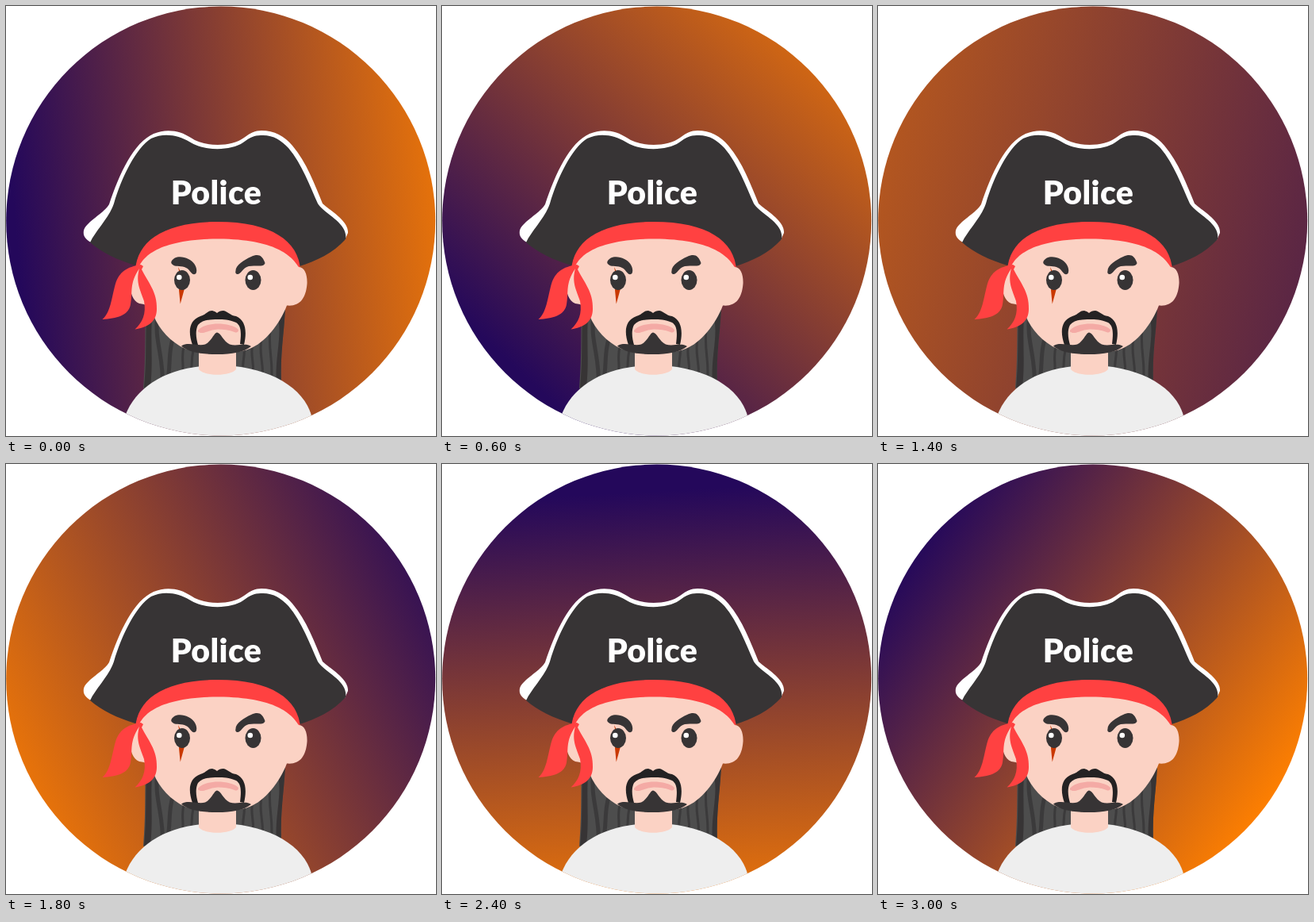
An HTML page that plays this animation: 542 px wide and 542 px high, repeating every 3.2 s.

```html
<!DOCTYPE html>
<html lang="en">
<head>
<meta charset="utf-8">
<title>Pirate badge</title>
<style>
  html, body { margin: 0; width: 100%; height: 100%; overflow: hidden; background: #fff; }
  svg { display: block; width: 100%; height: 100%; }
  .ink { fill: #373435; }
  .skin { fill: #fbd2c4; }
  .red { fill: #ff4141; }
  .white { fill: #fff; }
  .strand { fill: none; stroke: #3b3a3b; stroke-width: 3; }
  text { font: 900 41px Lato, "Open Sans", sans-serif; letter-spacing: .4px; fill: #fff; text-anchor: middle; }
</style>
</head>
<body>
<svg viewBox="0 0 542 542">
  <defs>
    <linearGradient id="sky" gradientUnits="userSpaceOnUse">
      <stop offset="0" stop-color="#24085b"/>
      <stop offset="1" stop-color="#ff8000"/>
    </linearGradient>
    <clipPath id="disc"><circle cx="270.7" cy="271" r="270.5"/></clipPath>
  </defs>
  <circle cx="270.7" cy="271" r="270.5" fill="url(#sky)"/>

  <!-- hair -->
  <path fill="#4d4d4d" d="M177 374C174 402 177 432 173 482L215 478L245 456V420L200 370Z"/>
  <path fill="#4d4d4d" d="M352 370C352 405 345 435 347 477L310 470L288 456V420L330 370Z"/>
  <path class="ink" d="M178 380L185 384C181 415 186 445 182 480L174 481C178 440 175 410 178 380ZM340 384L352 374C352 405 345 435 347 477L341 476C338 440 351 410 340 384Z"/>
  <g class="strand">
    <path stroke-width="5" d="M191 390C186 420 200 445 197 480M210 420C204 440 208 455 203 476"/>
    <path d="M224 430C220 445 226 455 221 468M236 434C233 448 235 455 233 462M300 430C302 440 297 450 299 462M311 426C307 440 314 450 311 470M322 420C318 440 326 450 323 474M333 408C330 435 338 450 334 476"/>
  </g>

  <!-- body -->
  <path clip-path="url(#disc)" fill="#eee" d="M150 517C164 479 205 453 267 453C329 453 376 480 385.500 518L380 542H150Z"/>
  <path class="skin" d="M243 428H290V458C283 467 250 467 243 458Z"/>

  <!-- hat -->
  <path class="white" d="M107 298C99 293 97 289 98 283C101 272 124 261 130 250C143 211 161 172 186 161C202 154 220 157 233 166C250 178 284 178 300 166C308 160 314 157 322 157C338 157 351 164 361 176C379 197 389 225 399 249C410 259 432 271 431 286L427 295Z"/>
  <path class="ink" d="M106 298C113 283 130 267 136 249C146 215 164 179 183 167C199 159 218 163 231 171C249 183 283 183 299 172C307 166 313 163 321 163C336 162 347 169 356 179C373 199 383 227 393 249C401 262 432 274 428 294C413 311 390 322 370 328L163 327C140 320 121 311 106 298Z"/>
  <text x="265" y="249.500">Police</text>
  <path class="red" d="M163 333C165 296 200 272 267 272C334 272 369 296 371 333Z"/>

  <!-- head -->
  <path class="skin" d="M166 333C171 317 190 294 268 293.500C340 294 360 315 369 329C377 329 380 340 379.500 350C378 369 370 379 354 377.500C345 401 326 425 307 432C287 440 246 440 226 432C208 424 193 408 186 390C180 378 177 376 168 375C159 371 156 360 156.500 347C157 338 161 334 166 333Z"/>
  <path class="red" d="M170 326C152 329 143 335 138 350C133 368 132 386 121.500 395C139 394 155 390 157 376C160 361 155 350 168 331C163 349 170 359 174 372C177 388 172 399 162.500 407.500C180 405 190 397 190 382C191 360 178 347 171 332L173 328Z"/>

  <!-- face -->
  <path fill="#c93800" d="M217 329C222 338 225 349 224.500 358L219.700 375.500L218 358C221 349 219 338 217 329Z"/>
  <g id="eye">
    <ellipse class="ink" cx="222" cy="345.500" rx="10" ry="12.500"/>
    <circle class="white" cx="218.300" cy="342" r="3.300"/>
  </g>
  <use href="#eye" x="89.500"/>
  <path class="ink" d="M208.500 322C212 315 222 315 230 319C238 323 242 331 239.500 337C235 341 233 334 228 330.500C221 326 215 330 210 326Q207.500 324 208.500 322ZM289.500 334C289 327 300 320 309 316C318 312 323 314 326.500 324C325 330 314 326 306 328C298 330 296 339 291 338Q288.500 337 289.500 334Z"/>
  <path fill="#f4aaa5" d="M242 409C247 403 257 400.500 267 400.500C277 400.500 289 403 293 408C293 412 290 412 288 411C281 408 274 407.500 267 407.500C259 408 253 411 248 412C244 412 242 412 242 409Z"/>
  <path fill="#242223" d="M235 427C229 410 231 396 245 391C253 389 253 384 260 384Q264 385 266 387Q269 384 274 384C280 385 282 390 290 391C302 396 304 410 300 427L295 426C297 410 296 403 290 399C281 395 274 395 267 395C256 395 247 396 242 402C238 410 240 420 242 427Z"/>
  <path class="ink" d="M221 428.500C229 423 242 429 251 426.500C259 423 262 412 266 411.500C271 412 274 423 282 426.500C291 429.500 302 424 309 429C300 436.500 285 439 266 439C245 439 229 436 221 428.500Z"/>
</svg>
<script>
  const LOOP = 3200, STEP = 200, R = 271;
  // time, direction in degrees, colour mix at the centre, mix change per radius
  const poses = [
    [0, -5, .43, .45],
    [600, -47, .38, .40],
    [1000, -106, .46, .23],
    [1400, -167, .45, .2],
    [1800, -207, .49, .4],
    [2400, -273, .41, .47],
    [3000, -325, .50, .49],
    [3200, -365, .43, .45]
  ];
  const sky = document.getElementById("sky");

  function poseAt(t) {
    const i = poses.findIndex(p => p[0] > t);
    const a = poses[i - 1], b = poses[i];
    const k = (t - a[0]) / (b[0] - a[0]);
    return a.map((v, n) => v + (b[n] - v) * k);
  }

  function place(n, angle, dist) {
    sky.setAttribute("x" + n, R + Math.cos(angle) * dist);
    sky.setAttribute("y" + n, R + Math.sin(angle) * dist);
  }

  function draw() {
    const t = Math.floor(performance.now() % LOOP / STEP) * STEP;
    const [, deg, mix, rate] = poseAt(t);
    const angle = deg * Math.PI / 180;
    place(1, angle, -mix / rate * R);
    place(2, angle, (1 - mix) / rate * R);
    requestAnimationFrame(draw);
  }
  draw();
</script>
</body>
</html>
```
